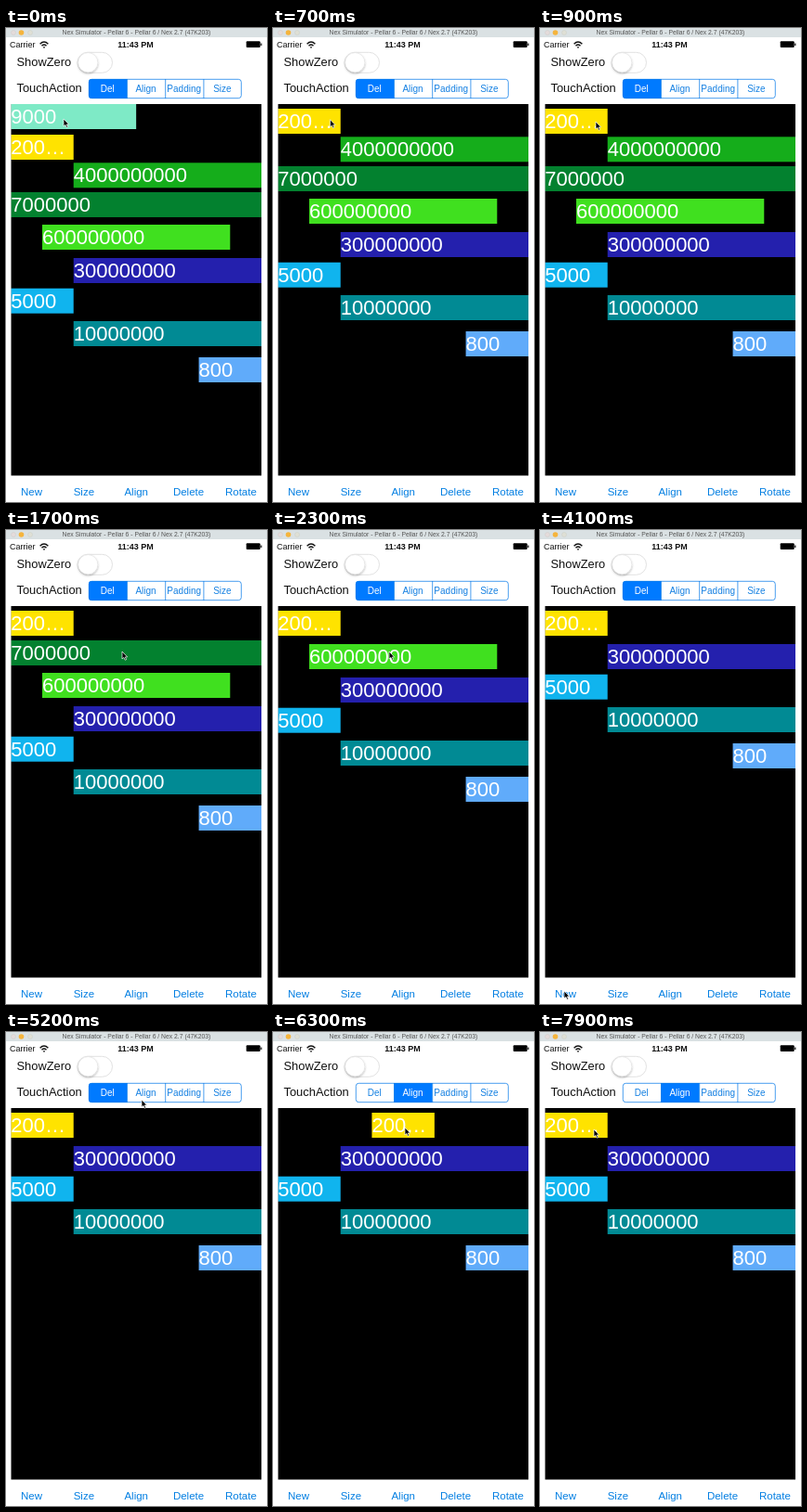
These frames come from a looping animation (281 px wide and 511 px high, 8000 ms). An HTML page:

```html
<!DOCTYPE html>
<html lang="en">
<head>
<meta charset="utf-8">
<title>Layout demo</title>
<style>
  html, body { margin: 0; width: 100%; height: 100%; overflow: hidden; background: #fff; }
  svg { display: block; width: 281px; height: 511px; font-family: "Liberation Sans", Arial, sans-serif; }
  .mid { text-anchor: middle; }
  .num { font-size: 22px; fill: #fff; }
  .seg { font-size: 10px; }
  .tool { font-size: 11.5px; fill: #047fe2; }
  .line { fill: none; stroke: #0b7de8; stroke-width: .75; }
</style>
</head>
<body>
<svg id="stage" viewBox="0 0 281 511">
  <defs>
    <filter id="soft" x="-30%" y="-30%" width="160%" height="170%">
      <feDropShadow dx="0" dy="1.2" stdDeviation="0.9" flood-color="#000" flood-opacity=".3"/>
    </filter>
    <clipPath id="pill"><rect x="89" y="55" width="164.7" height="21" rx="3"/></clipPath>
  </defs>
  <rect width="281" height="511" fill="#fff"/>

  <!-- window bar -->
  <rect width="281" height="10" fill="#dae1e3"/>
  <circle cx="8" cy="5" r="2.5" fill="#e4dcdb" stroke="#cfc8c8" stroke-width=".5"/>
  <circle cx="16.5" cy="5" r="2.8" fill="#f5b43c"/>
  <circle cx="26" cy="5" r="2.5" fill="#dfe0d6" stroke="#cbcdc4" stroke-width=".5"/>
  <text class="mid" x="140.5" y="7.4" font-size="6.8" fill="#555">Nex Simulator - Pellar 6 - Pellar 6 / Nex 2.7 (47K203)</text>

  <!-- status bar -->
  <text x="4" y="21.3" font-size="9" fill="#111">Carrier</text>
  <g fill="none" stroke="#111" stroke-width="1.4">
    <path d="M36.6 17.2Q41 12.8 45.4 17.2M38.5 19.2Q41 16.8 43.5 19.2"/>
    <circle cx="41" cy="20.8" r=".6" fill="#111" stroke-width=".6"/>
  </g>
  <text class="mid" x="139.5" y="21.3" font-size="9" font-weight="bold" fill="#111">11:43 PM</text>
  <rect x="258.7" y="14.3" width="15" height="6.7" rx="1" fill="#000"/>
  <rect x="274.2" y="16.5" width="1.2" height="2.5" fill="#111"/>

  <!-- switch and segments -->
  <g font-size="12.9" fill="#111">
    <text x="11.5" y="40.8">ShowZero</text>
    <text x="11.5" y="68.6">TouchAction</text>
  </g>
  <rect x="77" y="26.3" width="37.5" height="22" rx="11" fill="#fff" stroke="#e2e2e2"/>
  <circle cx="88.3" cy="37.2" r="10.6" fill="#fff" stroke="#d8d8d8" stroke-width=".5" filter="url(#soft)"/>
  <g clip-path="url(#pill)"><rect id="picked" y="55" width="41.2" height="21" fill="#007aff"/></g>
  <g id="segs"></g>
  <rect class="line" x="89.3" y="55.3" width="164" height="20.4" rx="3"/>

  <!-- list; the strip on its left softens the fractional edge -->
  <rect x="5" y="82" width="270" height="400.5" fill="#000"/>
  <g id="rows"></g>
  <rect y="82" width="5.5" height="401" fill="#fff"/>
  <g id="labels"></g>
  <g id="tools"></g>
  <path id="cursor" d="M0 0V8L1.9 6.4L3.2 9.2L4.6 8.6L3.3 5.9H5.7Z" fill="#000" stroke="#fff" stroke-width=".7" stroke-linejoin="round"/>
</svg>
<script>
const LOOP = 8000, STEP = 100, SLIDE = 250;
const LEFT = 5.3, WIDTH = 269.7;
const el = id => document.getElementById(id);

function add(parent, tag, attrs, text) {
  const node = document.createElementNS("http://www.w3.org/2000/svg", tag);
  for (const key in attrs) node.setAttribute(key, attrs[key]);
  if (text) node.textContent = text;
  return parent.appendChild(node);
}

// label, left and width as parts of the list, top, colour, time of removal, lift of later rows
const rows = [
  ["9000", 0, 1 / 2, 82, "#7eeac6", 50, 28],
  ["200…", 0, 1 / 4, 115, "#ffe300"],
  ["4000000000", 1 / 4, 3 / 4, 145.3, "#15ad1b", 1350, 30],
  ["7000000", 0, 1, 177, "#03812f", 2050, 31],
  ["600000000", 1 / 8, 3 / 4, 212, "#40e01f", 2550, 36],
  ["300000000", 1 / 4, 3 / 4, 248, "#2420ad"],
  ["5000", 0, 1 / 4, 280.7, "#10b4ee"],
  ["10000000", 1 / 4, 3 / 4, 316, "#018a94"],
  ["800", 3 / 4, 1 / 4, 355, "#60abfa"]
].map(([label, part, size, y, color, gone, lift]) => ({
  bar: add(el("rows"), "rect", { width: size * WIDTH, height: 27, fill: color }),
  text: add(el("labels"), "text", { class: "num", y: 21.1 }, label),
  x: LEFT + part * WIDTH, y, gone, lift
}));

const segs = ["Del", "Align", "Padding", "Size"].map((name, i) => {
  const x = 89 + i * 41.2;
  if (i) add(el("segs"), "path", { class: "line", d: `M${x + .3} 55V76` });
  return add(el("segs"), "text", { class: "seg mid", x: x + 20.3, y: 69.1 }, name);
});

["New", "Size", "Align", "Delete", "Rotate"].forEach((name, i) =>
  add(el("tools"), "text", { class: "tool mid", x: 27.5 + i * 56.35, y: 503.8 }, name));

// time, x, y
const path = [
  [0, 62, 98], [600, 62, 98], [900, 60, 101], [1000, 60, 101],
  [1300, 125, 131], [2350, 125, 131], [2550, 125, 142], [2800, 124, 145],
  [2900, 123, 153], [3100, 123, 153], [4000, 26, 497], [4100, 26, 497],
  [4900, 113, 131], [5200, 146, 73], [5400, 147, 68], [5500, 147, 68],
  [5800, 56, 102], [6050, 56, 102], [6300, 142, 103], [6700, 142, 103],
  [6900, 238, 102], [7300, 238, 102], [7500, 60, 105], [7700, 58, 105]
];
// time, part of the list where the yellow row goes
const aligns = [[5850, 3 / 8], [6450, 3 / 4], [7050, 0]];

const clamp = v => Math.min(1, Math.max(0, v));
const ease = p => p * p * (3 - 2 * p);
const slide = (t, start) => ease(clamp((t - start) / SLIDE));
const place = (node, x, y) => node.setAttribute("transform", `translate(${x} ${y})`);

function cursorAt(t) {
  const i = path.findIndex(p => p[0] > t);
  if (i < 0) return path[path.length - 1].slice(1);
  const [t0, x0, y0] = path[i - 1], [t1, x1, y1] = path[i];
  const p = ease((t - t0) / (t1 - t0));
  return [x0 + (x1 - x0) * p, y0 + (y1 - y0) * p];
}

function draw(t) {
  let lift = 0;
  rows.forEach((row, i) => {
    let x = row.x;
    if (i === 1) for (const [start, part] of aligns) x += (LEFT + part * WIDTH - x) * slide(t, start);
    for (const node of [row.bar, row.text]) {
      place(node, x, row.y - lift);
      node.setAttribute("visibility", t >= row.gone ? "hidden" : "visible");
    }
    if (row.gone) lift += row.lift * slide(t, row.gone);
  });
  const chosen = t < 5400 ? 0 : 1;
  el("picked").setAttribute("x", 89 + chosen * 41.2);
  segs.forEach((s, i) => s.setAttribute("fill", i === chosen ? "#fff" : "#1580e2"));
  place(el("cursor"), ...cursorAt(t));
}

const begin = performance.now();
function tick() {
  const t = (performance.now() - begin) % LOOP;
  draw(Math.floor(t / STEP) * STEP);
  requestAnimationFrame(tick);
}
draw(0);
requestAnimationFrame(tick);
</script>
</body>
</html>
```
